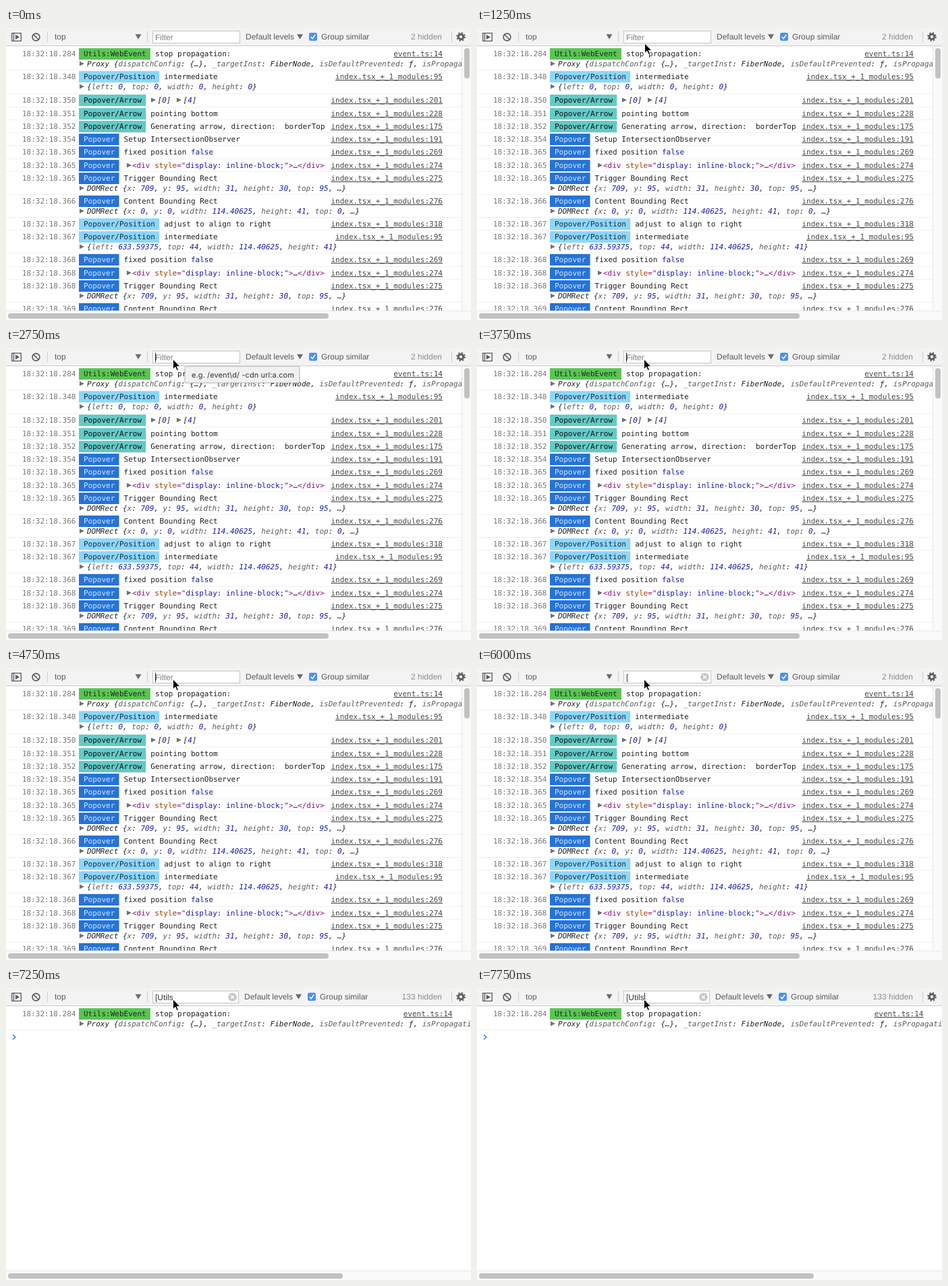
An HTML page that plays this animation: 689x434 px, repeating every 8000 ms.

```html
<!DOCTYPE html>
<html lang="en">
<head>
<meta charset="utf-8">
<title>Console filter</title>
<style>
html, body { margin: 0; width: 100%; height: 100%; overflow: hidden; background: #fff; }
svg { display: block; }
text { white-space: pre; text-rendering: geometricPrecision; }
.ui { font: 12px "Liberation Sans", Arial, sans-serif; fill: #5a5a5a; }
.log { font: 11px "DejaVu Sans Mono", monospace; fill: #222; }
.obj { font-style: italic; }
.time { fill: #777; }
.ref { fill: #484848; text-anchor: end; text-decoration: underline; }
.key { fill: #5c5c5c; }
.num { fill: #1a1aa6; }
.tag { fill: #881280; }
.attr { fill: #994500; }
.faint { fill: #8c8c8c; }
.tip { font: 11px Inter, sans-serif; letter-spacing: .1px; fill: #333; }
</style>
</head>
<body>
<svg id="stage" width="689" height="434" viewBox="0 0 689 434"></svg>
<script>
const LOOP = 8000;
const BADGES = {
  "Utils:WebEvent": ["#59c653", "#1d2b1d"],
  "Popover/Position": ["#8bd7ff", "#1d2b36"],
  "Popover/Arrow": ["#62cac8", "#111"],
  "Popover": ["#2673d5", "#d3e8ff"]
};

const rect = (x, y, w, h, fill, extra = "") =>
  `<rect x="${x}" y="${y}" width="${w}" height="${h}" fill="${fill}" ${extra}/>`;
const text = (x, y, cls, body, extra = "") =>
  `<text x="${x}" y="${y}" class="${cls}" ${extra}>${body}</text>`;
const span = (cls, body) => `<tspan class="${cls}">${body}</tspan>`;
const group = (cls, body) => `<g class="${cls}">${body}</g>`;
const right = (x, y) => `<path d="M${x} ${y - 3.5}l7 3.5-7 3.5z" fill="#727272"/>`;
const down = x => `<path d="M${x} 9.2h9l-4.5 7.6z" fill="#6b6b6b"/>`;
const divider = x => rect(x, 5, 1, 16, "#ccc");

// Colours keys and numbers of an object preview
const preview = s => s.replace(/(\w+)(?=:)|\d[\d.]*/g, (m, key) => span(key ? "key" : "num", m));

const DIV = span("tag", "&lt;div ") + span("attr", "style") + span("tag", '="') +
  span("num", "display: inline-block;") + span("tag", '"&gt;') + "…" + span("tag", "&lt;/div&gt;");
const FIXED = "fixed position " + span("num", "false");
const RECT = "DOMRect {x: 709, y: 95, width: 31, height: 30, top: 95, …}";
const EVENT = [38, 284, "Utils:WebEvent", "stop propagation:", "event.ts:14",
  "Proxy {dispatchConfig: {…}, _targetInst: FiberNode, isDefaultPrevented: ƒ, isPropagationStopped: ƒ}"];

// Row: centre, milliseconds, badge, message, link, object on the second line
const ROWS = [
  EVENT,
  [72, 348, "Popover/Position", "intermediate", 95, "{left: 0, top: 0, width: 0, height: 0}"],
  [107, 350, "Popover/Arrow", "", 201],
  [127, 351, "Popover/Arrow", "pointing bottom", 228],
  [146, 352, "Popover/Arrow", "Generating arrow, direction:\u00a0 borderTop", 175],
  [165, 354, "Popover", "Setup IntersectionObserver", 191],
  [184, 365, "Popover", FIXED, 269],
  [204, 365, "Popover", DIV, 274],
  [223, 365, "Popover", "Trigger Bounding Rect", 275, RECT],
  [257, 366, "Popover", "Content Bounding Rect", 276,
    "DOMRect {x: 0, y: 0, width: 114.40625, height: 41, top: 0, …}"],
  [291, 367, "Popover/Position", "adjust to align to right", 318],
  [310, 367, "Popover/Position", "intermediate", 95,
    "{left: 633.59375, top: 44, width: 114.40625, height: 41}"],
  [344, 368, "Popover", FIXED, 269],
  [364, 368, "Popover", DIV, 274],
  [383, 368, "Popover", "Trigger Bounding Rect", 275, RECT],
  [417, 369, "Popover", "Content Bounding Rect", 276]
];

function row([c, ms, badge, msg, ref, obj], edge) {
  const [bg, fg] = BADGES[badge], w = (badge.length + 2) * 6.62, base = c + 4;
  const link = typeof ref === "number" ? "index.tsx_+_1_modules:" + ref : ref;
  const isNode = msg === DIV;
  let out = c > 40 ? rect(0, c - 10, 689, 1, "#f0f0f0") : "";
  out += text(24, base, "log time", "18:32:18." + ms);
  out += rect(108, c - 8, w, 17, bg) + text(115, base, "log", badge, `style="fill:${fg}"`);
  out += text(isNode ? 187 : 108 + w + 7, base, "log", msg);
  if (isNode) out += right(179, c);
  if (obj) out += right(109, c + 15) + text(120, c + 19, "log obj", preview(obj));
  return out + text(edge, base, "log ref", link);
}

const thumb = (x, y, w, h) => rect(x, y, w, h, "#c1c1c1", 'rx="4"');
const bottomBar = w =>
  rect(0, 420, 689, 14, "#fafafa") + rect(0, 420, 689, 1, "#e8e8e8") + thumb(3, 424, w, 8);

const full = group("full",
  ROWS.map(r => row(r, 647)).join("") +
  right(215, 107) + text(224.5, 111, "log obj", preview("[0]")) +
  right(253, 107) + text(262.5, 111, "log obj", preview("[4]")) +
  rect(675, 27, 14, 393, "#fafafa") + rect(675, 27, 1, 393, "#e8e8e8") + thumb(679, 30, 8, 45) +
  bottomBar(475));

const filtered = group("filtered",
  row(EVENT, 661.5) + rect(0, 62, 689, 1, "#f0f0f0") +
  '<path d="M10 69.5l3.8 3.5-3.8 3.5" fill="none" stroke="#367cf1" stroke-width="1.6"/>' +
  bottomBar(496));

const icons = `<g fill="none" stroke="#5a5a5a">
  <path d="M8.7 7.7h13.6v11.6H8.7zM11.5 8v11" stroke-width="1.3"/>
  <path d="M14 10l6 3.5-6 3.5z" fill="#5a5a5a" stroke="none"/>
  <circle cx="44.5" cy="13.5" r="5.4" stroke-width="1.6"/>
  <path d="M40.7 9.7l7.6 7.6" stroke-width="1.6"/>
  <circle cx="674" cy="13" r="3.7" stroke-width="2.8"/>
  <circle cx="674" cy="13" r="5.8" stroke-width="2" stroke-dasharray="2.278"/>
</g>`;

const toolbar = rect(0, 0, 689, 27, "#f3f3f3") + rect(0, 26, 689, 1, "#ccc") + icons +
  divider(61) + divider(209) + divider(660) +
  text(72, 17, "ui", "top") + down(191.5) +
  rect(217.5, 4.5, 129, 18, "#fff", 'class="input" stroke="#c4c4c4"') +
  group("hint", text(221, 18, "ui", "Filter", 'style="fill:#7b7b7b"')) +
  text(221, 18, "ui", ["[", "U", "ti", "ls"].map((s, i) => span("typed" + i, s)).join(""), 'style="fill:#333"') +
  group("shift",
    group("clear", '<circle cx="337.5" cy="13.5" r="6.2" fill="#c6c6c6"/>' +
      '<path d="M335 11l5 5m0-5l-5 5" stroke="#fff" stroke-width="1.3"/>') +
    text(355, 17, "ui", "Default levels") + down(431) +
    rect(449, 7, 12, 12, "#4a90f3", 'rx="2.5"') +
    '<path d="M451.8 13.2l2.4 2.7 4-6" fill="none" stroke="#fff" stroke-width="1.6"/>' +
    text(467, 17, "ui", "Group similar")) +
  group("full", text(646, 17, "ui faint", "2 hidden", 'text-anchor="end"')) +
  group("filtered", text(646, 17, "ui faint", "133 hidden", 'text-anchor="end"'));

const tooltip = group("tooltip",
  rect(264, 29, 172, 25, "#000", 'rx="2" opacity=".06"') +
  rect(264, 28, 172, 24.5, "#000", 'rx="1" opacity=".08"') +
  rect(265.5, 27.5, 169, 24, "#f1f1f1", 'stroke="#c9c9c9"') +
  group("tiptext", text(275, 44, "tip", "e.g. /event\\d/ -cdn url:a.com")));

const caret = group("blink", group("caret", rect(0, 7, 1, 14, "#222")));
const pointer = group("pointer",
  '<path d="M.5.8V15.4L3.9 12.2 6.2 17.4 8.5 16.4 6.2 11.4H10.8Z" fill="#000" stroke="#fff" stroke-width=".9"/>');

document.getElementById("stage").innerHTML = full + filtered + toolbar + caret + tooltip + pointer;

// Stepped track: pairs of time in ms and value
function track(name, prop, steps) {
  const frames = [...steps, [LOOP, steps[steps.length - 1][1]]]
    .map(([t, v]) => `${t / LOOP * 100}%{${prop}:${v}}`).join("");
  return `@keyframes ${name}{${frames}}.${name}{animation:${name} ${LOOP}ms step-end infinite}`;
}
const moves = (name, steps) =>
  track(name, "transform", steps.map(([t, x, y = 0]) => [t, `translate(${x}px,${y}px)`]));
const toggles = (name, on, ...times) =>
  track(name, "visibility", [0, ...times].map((t, i) => [t, (i % 2 === 0) === on ? "visible" : "hidden"]));

const style = document.createElement("style");
style.textContent = [
  moves("pointer", [[0, -40, -40], [1000, 221, 36], [1250, 248, 22], [1750, 247, 16]]),
  toggles("tooltip", false, 1750, 3000),
  track("tiptext", "opacity", [[0, .5], [2000, 1]]),
  toggles("blink", false, 2750, 3250, 3750, 4250, 4750, 5250, 5500, 6000, 6250, 7250, 7750),
  moves("caret", [[0, 221], [5500, 224], [6250, 233], [6500, 239], [6750, 248]]),
  toggles("hint", true, 5500),
  toggles("clear", false, 5500),
  ...[5500, 6250, 6500, 6750].map((t, i) => toggles("typed" + i, false, t)),
  toggles("full", true, 6250),
  toggles("filtered", false, 6250),
  moves("shift", [[0, 0], [6250, -2]]),
  track("input", "width", [[0, "129px"], [6250, "127px"]])
].join("\n");
document.head.append(style);
</script>
</body>
</html>
```
